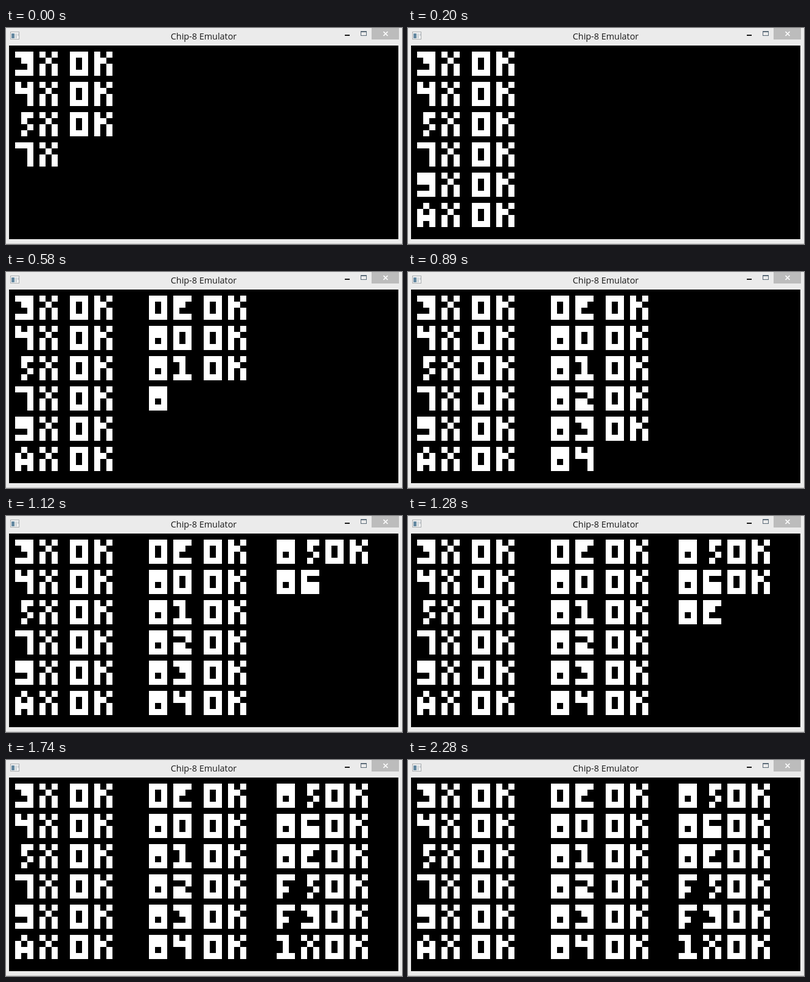
An HTML page that plays this animation: 651 by 357 pixels, repeating every 2980 ms.

```html
<!DOCTYPE html>
<html lang="en">
<head>
<meta charset="utf-8">
<title>Chip-8 Emulator</title>
<style>
  html, body { margin: 0; width: 100%; height: 100%; overflow: hidden; background: #ebebeb; }
  svg { display: block; }
  text { font: 14.4px "Open Sans", "Noto Sans", sans-serif; fill: #1a1a1a; }
</style>
</head>
<body>
<svg width="651" height="357" viewBox="0 0 651 357">
  <rect width="651" height="357" fill="#ebebeb"/>
  <rect y="356" width="651" height="1" fill="#c8c8c8"/>

  <!-- title bar -->
  <rect x="7.5" y="6.5" width="14" height="12" fill="#f4f4f4" stroke="#a9adaf"/>
  <rect x="9" y="9" width="5" height="8" fill="#6488a0"/>
  <path d="M15 9h3v8h-3zM19 9h2v4h-2z" fill="#cfd5d8"/>
  <text x="325" y="19" text-anchor="middle">Chip-8 Emulator</text>
  <rect x="557" y="11" width="8" height="2" fill="#1a1a1a"/>
  <path d="M583 5h10v8h-10zM584 7v5h8v-5z" fill="#5b6b78" fill-rule="evenodd"/>
  <rect x="601" width="45" height="19" fill="#bcbcbc"/>
  <path d="M620.5 6l7 7M627.5 6l-7 7" stroke="#fff" stroke-width="1.7"/>

  <!-- 64 x 32 display -->
  <rect x="5" y="29" width="640" height="320"/>
  <path id="pixels" transform="translate(5 29) scale(10)" fill="#fff" shape-rendering="crispEdges"/>
</svg>
<script>
const LOOP = 2980;
const TICK = 76.7;      // ms between screen refreshes
const PHASE = 35;       // ms already spent in the first refresh
const START_CYCLE = 37.2;
const CYCLES_PER_TICK = 7.33;

// One hex digit per row; its three high bits are the pixels.
const GLYPHS = {
  0: 'EAAE', 1: 'C44E', 2: 'E2CE', 3: 'E62E', 4: 'AE22', 5: '6424',
  6: 'E8EE', 7: 'E222', 8: 'EEAE', 9: 'EE2E', A: '4AEA', E: 'EC8E',
  F: 'E8C8', X: 'A4AA', O: 'EAAE', K: 'ACAA'
};

// Each test is its two-glyph label and the CPU cycles it takes to reach OK.
const COLUMNS = [
  { x: 1, okX: 10, setup: 6, tests: '3X:3 4X:4 5X:4 7X:5 9X:4 AX:3' },
  { x: 23, okX: 32, setup: 4, tests: '0E:2 80:5 81:6 82:7 83:7 84:7' },
  { x: 44, okX: 52, setup: 3, tests: '85:7 86:6 8E:6 F5:10 F3:9 1X:3' }
];

function glyph(char, x, y) {
  let d = '';
  [...GLYPHS[char]].forEach((digit, row) => {
    for (let col = 0; col < 3; col++) {
      if (parseInt(digit, 16) & (8 >> col)) d += `M${x + col} ${y + row}h1v1h-1z`;
    }
  });
  return d;
}

// Every sprite remembers the CPU cycle at which it is drawn.
const sprites = [];
let cycle = 0;
function add(cost, d) {
  cycle += cost;
  sprites.push({ cycle, d });
}

for (const { x, okX, setup, tests } of COLUMNS) {
  cycle += setup;
  tests.split(' ').forEach((test, row) => {
    const [label, cost] = test.split(':');
    const y = 1 + row * 5;
    add(3, glyph(label[0], x, y));
    add(2, glyph(label[1], x + 4, y));
    add(+cost, glyph('O', okX, y) + glyph('K', okX + 4, y));
  });
}

const pixels = document.getElementById('pixels');
const start = performance.now();
let shownTick = -1;

function draw(now) {
  const t = Math.max(0, now - start) % LOOP;
  const tick = Math.floor((t + PHASE) / TICK);
  if (tick !== shownTick) {
    const reached = START_CYCLE + tick * CYCLES_PER_TICK;
    pixels.setAttribute('d', sprites.filter(s => s.cycle <= reached).map(s => s.d).join(''));
    shownTick = tick;
  }
  requestAnimationFrame(draw);
}
draw(start);
</script>
</body>
</html>
```
